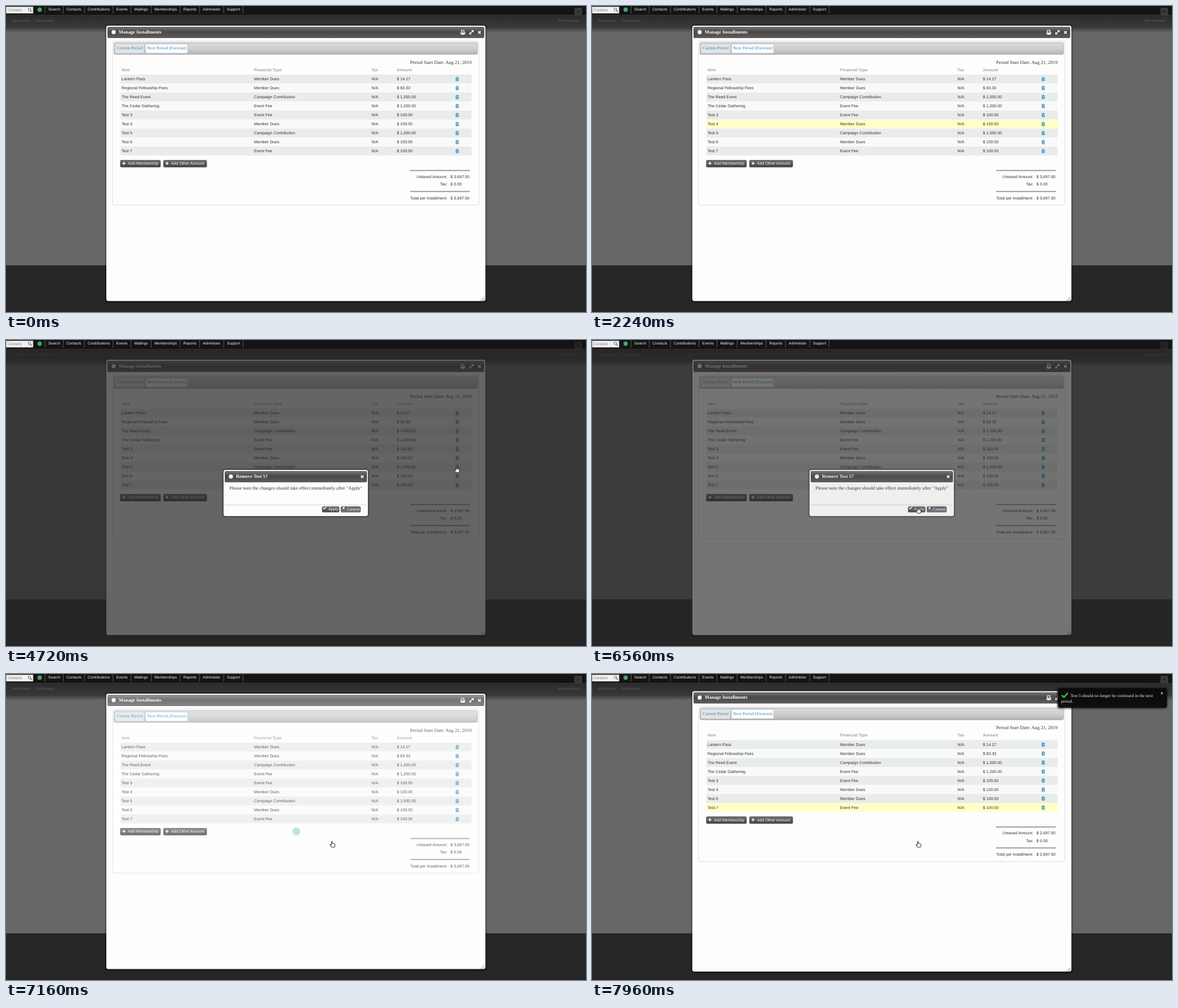
Write an HTML page that moves like this. It is 1029 px wide and 544 px high and loops after 8000 ms.

```html
<!DOCTYPE html>
<html lang="en">
<head>
<meta charset="utf-8">
<title>Manage Installments</title>
<style>
html, body { margin: 0; width: 100%; height: 100%; overflow: hidden; background: #262626; }
svg { display: block; width: 100vw; height: 100vh; }
text { font-family: "Liberation Sans", Arial, sans-serif; font-size: 7.15px; fill: #333; text-rendering: geometricPrecision; white-space: pre; }
.serif { font-family: "Liberation Serif", "Times New Roman", serif; }
.bold { font-weight: bold; }
</style>
</head>
<body>
<svg id="stage" viewBox="0 0 1029 544">
  <defs>
    <linearGradient id="bar" x2="0" y2="1">
      <stop offset="0" stop-color="#747474"/><stop offset=".45" stop-color="#484848"/><stop offset="1" stop-color="#5c5c5c"/>
    </linearGradient>
    <linearGradient id="tabs" x2="0" y2="1">
      <stop offset="0" stop-color="#d9d9d9"/><stop offset=".5" stop-color="#cfcfcf"/><stop offset="1" stop-color="#b4b4b4"/>
    </linearGradient>
    <linearGradient id="btn" x2="0" y2="1">
      <stop offset="0" stop-color="#707070"/><stop offset="1" stop-color="#434343"/>
    </linearGradient>
    <linearGradient id="cool" x2="0" y2="1">
      <stop offset="0" stop-color="#545a5f"/><stop offset="1" stop-color="#747a80"/>
    </linearGradient>
    <linearGradient id="under" x2="0" y2="1">
      <stop offset="0" stop-color="#3a3a3a"/><stop offset="1" stop-color="#666"/>
    </linearGradient>
    <linearGradient id="strip" x2="0" y2="1">
      <stop offset="0" stop-color="#2a2a2a"/><stop offset="1" stop-color="#383838"/>
    </linearGradient>
    <filter id="glow" x="-5%" y="-5%" width="110%" height="110%">
      <feGaussianBlur stdDeviation="1.8"/>
    </filter>
  </defs>
</svg>
<script>
const NS = "http://www.w3.org/2000/svg";
const stage = document.getElementById("stage");
const LOOP = 8000, TICK = 40;

function add(parent, tag, attrs = {}, content) {
  const el = document.createElementNS(NS, tag);
  for (const k in attrs) el.setAttribute(k, attrs[k]);
  if (content !== undefined) el.textContent = content;
  parent.appendChild(el);
  return el;
}
const group = (p, attrs) => add(p, "g", attrs);
const rect = (p, x, y, width, height, fill, more) => add(p, "rect", { x, y, width, height, fill, ...more });
const path = (p, d, more) => add(p, "path", { d, fill: "none", ...more });
const dot = (p, cx, cy, r, fill) => add(p, "circle", { cx, cy, r, fill });
function label(p, x, y, str, { size, fill, cls, end } = {}) {
  let style = "";
  if (size) style += `font-size:${size}px;`;
  if (fill) style += `fill:${fill};`;
  return add(p, "text", { x, y, style, class: cls || "", "text-anchor": end ? "end" : "start" }, str);
}
const cross = (p, x, y, r, w) =>
  path(p, `M${x - r} ${y - r}l${2 * r} ${2 * r}m0 ${-2 * r}l${-2 * r} ${2 * r}`, { stroke: "#fff", "stroke-width": w });

// Page behind the dialog
const page = group(stage);
rect(page, 0, 0, 1029, 461, "#666");
rect(page, 0, 461, 1029, 83, "#262626");
rect(page, 0, 14, 1029, 24, "url(#strip)");
rect(page, 0, 38, 1029, 9, "url(#under)");
[[11, "Add contact"], [52, "Find contact"], [980, "Edit shortcuts"]].forEach(([x, s]) =>
  label(page, x, 27.5, s, { size: 6.1, fill: "#626262" }));

// Main dialog
const dialog = group(stage);
const shade = rect(dialog, 177, 34, 675, 493, "#000", { rx: 4, opacity: .45, filter: "url(#glow)" });
const frame = rect(dialog, 178.5, 35.5, 671.5, 488.5, "#fdfdfd", { rx: 2.5, stroke: "#fff" });
rect(dialog, 180.5, 37.5, 667.5, 19, "url(#bar)", { rx: 1.5, stroke: "#4a4a4a", "stroke-width": .8 });
dot(dialog, 191, 46.5, 3.7, "#f4f4f4");
label(dialog, 200, 48.5, "Manage Installments", { size: 8.45, fill: "#fff", cls: "serif bold" });
path(dialog, "M808 46v-3h4.5v3M807 46.5h7v3h-7zM808.3 48.5h4.4v2h-4.4z", { stroke: "#fff", "stroke-width": 1.1 });
path(dialog, "M823 49.5l5.5-5.5M825.8 43.6h3.2v3.2M822.6 46.8v3.2h3.2", { stroke: "#fff", "stroke-width": 1.2 });
cross(dialog, 840, 47, 2.2, 1.8);
const grip = path(dialog, "M842 524l7-7M844.5 524l4.5-4.5M847 524l2-2", { stroke: "#888", "stroke-width": .9 });

const panel = rect(dialog, 189, 62.5, 650, 291.5, "none", { rx: 3, stroke: "#dcdce2" });
rect(dialog, 191.5, 65, 645, 21, "url(#tabs)", { rx: 2.5, stroke: "#a9a9b4", "stroke-width": .9 });
rect(dialog, 193.5, 67.5, 51.5, 16.5, "#e4e4e4", { rx: 1.5, stroke: "#c8c8c8", "stroke-width": .8 });
rect(dialog, 247.5, 67.5, 75, 16.5, "#fff", { rx: 1.5, stroke: "#b4b4b4", "stroke-width": .8 });
label(dialog, 196.5, 77.2, "Current Period", { size: 7.7, fill: "#2786c2", cls: "serif" });
label(dialog, 250.3, 77.2, "Next Period (Forecast)", { size: 7.7, fill: "#2786c2", cls: "serif" });
label(dialog, 826, 102.7, "Period Start Date: Aug 21, 2019", { size: 8.5, cls: "serif", end: true });

const COLS = [205, 440, 648.5, 693.5];
["Item", "Financial Type", "Tax", "Amount"].forEach((s, i) =>
  label(dialog, COLS[i], 115.9, s, { fill: "#a2a2a2", cls: "bold" }));

const DUES = "Member Dues", FEE = "Event Fee", GIFT = "Campaign Contribution";
const rows = [
  ["Lantern Pass", DUES, "14.17"],
  ["Regional Fellowship Fees", DUES, "83.33"],
  ["The Reed Event", GIFT, "1,000.00"],
  ["The Cedar Gathering", FEE, "1,200.00"],
  ["Test 3", FEE, "100.00"],
  ["Test 4", DUES, "100.00"],
  ["Test 5", GIFT, "1,000.00"],
  ["Test 6", DUES, "100.00"],
  ["Test 7", FEE, "100.00"]
].map(([item, type, sum]) => {
  const g = group(dialog);
  const back = rect(g, 203, 122, 623, 16, "#fff");
  rect(g, 203, 137.5, 623, .5, "#f4f4f4");
  [item, type, "N/A", "$ " + sum].forEach((s, i) => label(g, COLS[i], 132.3, s));
  const bin = path(g, "M797.6 127.9h5.8M799.4 127.6v-.9h2.2v.9M798.4 128.4v4.6h4.2v-4.6M799.8 129.3v2.8M801.2 129.3v2.8",
    { "stroke-width": 1 });
  return { g, back, bin };
});
const REMOVED = 6;

// Buttons and totals, below the table
const foot = group(dialog);
function button(p, x, y, w, h, str, textX, textY, fill, edge) {
  rect(p, x, y, w, h, fill, { rx: 1.5, stroke: edge, "stroke-width": .8 });
  label(p, textX, textY, str, { fill: "#f4f4f4" });
}
[[203, 71, "Add Membership"], [279.5, 76.5, "Add Other Amount"]].forEach(([x, w, s]) => {
  button(foot, x, 274.3, w, 12, s, x + 13.2, 282.4, "url(#btn)", "#3a3a3a");
  path(foot, `M${x + 3.5} 279.7h5.4m-2.7-2.7v5.4`, { stroke: "#fff", "stroke-width": 1.5 });
});
rect(foot, 717, 291.5, 106, 1.9, "#999");
rect(foot, 717, 328.8, 106, 1.9, "#999");
const sums = [["Untaxed Amount:", 305.9], ["Tax:", 319.3], ["Total per Installment:", 343.5]].map(([s, y]) => {
  label(foot, 783, y, s, { end: true });
  return label(foot, 788.6, y, "$ 0.00");
});

// Busy veil over the dialog
const veil = rect(dialog, 179, 36, 670.5, 488, "#fff");
const spinner = dot(stage, 515, 280, 7, "#4bb36e");

// Confirmation
const dim = rect(stage, 0, 0, 1029, 544, "#252525");
const modal = group(stage);
rect(modal, 385, 230, 258, 84, "#000", { rx: 4, opacity: .5, filter: "url(#glow)" });
rect(modal, 386.5, 231.5, 255, 81, "#fdfdfd", { rx: 2.5, stroke: "#fff" });
rect(modal, 388.5, 233.5, 251.5, 19, "url(#bar)", { rx: 1.5, stroke: "#4a4a4a", "stroke-width": .8 });
dot(modal, 399, 242.8, 3.7, "#f4f4f4");
label(modal, 408, 244.9, "Remove Test 5?", { size: 8.45, fill: "#fff", cls: "serif bold" });
cross(modal, 632, 243, 2.2, 1.8);
label(modal, 396.5, 265.8, 'Please note the changes should take effect immediately after "Apply"', { size: 8.5, cls: "serif" });
rect(modal, 388, 292.8, 252, .9, "#ccc");
button(modal, 561, 296.2, 30, 9.8, "Apply", 572, 303.2, "url(#btn)", "#7c4a40");
button(modal, 594.3, 296.2, 34.5, 9.8, "Cancel", 605, 303.2, "url(#cool)", "#50565c");
path(modal, "M562.8 298.4l1.8 2 3.4-4", { stroke: "#fff", "stroke-width": 1.4 });
cross(modal, 599, 298.6, 1.7, 1.3);

// Menu bar
rect(stage, 0, 0, 1029, 14.5, "#141414");
rect(stage, 0, 14, 1029, 1, "#080808");
rect(stage, .5, 1.5, 47.5, 11.5, "#f0f0f0", { stroke: "#bbb", "stroke-width": .6 });
label(stage, 2.8, 9.2, "Contacts", { size: 6.35, fill: "#7d7d7d" });
add(stage, "circle", { cx: 41.6, cy: 6, r: 2.3, fill: "none", stroke: "#666" });
path(stage, "M43.3 7.8l2.5 2.5", { stroke: "#666", "stroke-width": 1.4 });
dot(stage, 59.7, 6.5, 3.9, "#43a566");
[[75, "Search"], [107.3, "Contacts"], [145, "Contributions"], [195.6, "Events"], [227.4, "Mailings"],
 [263.3, "Memberships"], [314.6, "Reports"], [349, "Administer"], [392, "Support"], [426.5]].forEach(([x, s]) => {
  rect(stage, x - 6.2, 0, .8, 13.5, "#6a6a6a");
  if (s) label(stage, x, 8.4, s, { size: 6.67, fill: "#f4f4f4" });
});
const hideBox = group(stage);
rect(hideBox, 1008.5, 3, 13.5, 14, "#3a3a3a", { rx: 2 });
path(hideBox, "M1013.7 8.5l3 3m0-3l-3 3", { stroke: "#141414", "stroke-width": 1.2 });

// Notice
const toast = group(stage);
rect(toast, 825, 24, 196, 38, "#000", { rx: 5, opacity: .5, filter: "url(#glow)" });
rect(toast, 826.5, 25, 193.5, 35, "#0b0b0b", { rx: 4, opacity: .94 });
path(toast, "M833.5 37.8l3.7 3.6 7-7.6", { stroke: "#35c22f", "stroke-width": 2.7 });
label(toast, 849, 41.4, "Test 5 should no longer be continued in the next", { size: 7.62, fill: "#f2f2f2", cls: "serif" });
label(toast, 832, 51.2, "period.", { size: 7.62, fill: "#f2f2f2", cls: "serif" });
label(toast, 1009, 36.4, "x", { size: 8, fill: "#fff", cls: "serif bold" });

// Hand pointer
const hand = group(stage);
path(hand, "M-1.3 .6Q-.5-.6 .4.6V4Q1.6 3.3 2.2 4.2Q3.4 3.6 3.9 4.6Q5 4.2 5.1 5.4V7.8L4.2 10.4H-1L-3.6 6.8Q-4.2 5.4-2.6 5.6L-1.3 6.8Z",
  { style: "fill:#fff", stroke: "#111", "stroke-width": .9, "stroke-linejoin": "round" });

// Steps: [start, value]
const HOVER = [[0, -1], [520, 3], [1320, -1], [2240, 5], [2640, 6], [4400, -1], [7960, 8]];
const POINTER = [[0, null], [4560, [799.4, 225.3]], [6160, [578.6, 297.5]]];
const GROWTH = [[0, 0], [7400, 1], [7760, 9]];
const OPEN = 4560, CLOSE = 6560, CLOSED = 6920, BUSY = 7000, UPDATE = 7400, DONE = 7600;

const at = (steps, t) => steps.reduce((v, [from, next]) => t >= from ? next : v, null);
const ramp = (t, a, b) => Math.min(1, Math.max(0, (t - a) / (b - a)));
const show = (el, on) => el.setAttribute("visibility", on ? "visible" : "hidden");
const fade = (el, v) => el.setAttribute("opacity", v);
const move = (el, x, y) => el.setAttribute("transform", `translate(${x} ${y})`);

function render(time) {
  const t = Math.floor(time % LOOP / TICK) * TICK;
  const updated = t >= UPDATE, grown = at(GROWTH, t);
  const hover = at(HOVER, t);

  rows.forEach((row, i) => {
    const n = updated && i > REMOVED ? i - 1 : i;
    const odd = n % 2 === 0;
    show(row.g, !(updated && i === REMOVED));
    move(row.g, 0, n * 16);
    row.back.setAttribute("fill", i === hover ? (odd ? "#ffffa3" : "#ffffc8") : (odd ? "#e8ecea" : "#f9f9f9"));
    row.bin.setAttribute("stroke", i === REMOVED && t >= 3440 && t < 4400 ? "#b03020" : "#2786c2");
  });
  const total = updated ? "$ 2,697.50" : "$ 3,697.50";
  sums[0].textContent = sums[2].textContent = total;
  move(foot, 0, updated ? -16 : 0);
  panel.setAttribute("height", updated ? 275.5 : 291.5);

  move(dialog, 0, -grown / 2);
  frame.setAttribute("height", 488.5 + grown);
  shade.setAttribute("height", 493 + grown);
  move(grip, 0, grown);

  const busy = ramp(t, BUSY, BUSY + 200) * (1 - ramp(t, 7360, DONE));
  fade(veil, busy * .3);
  fade(spinner, busy * .4);

  const open = ramp(t, OPEN - 80, OPEN + 160) * (1 - ramp(t, CLOSE - TICK, CLOSED));
  show(dim, t >= OPEN);
  show(modal, t >= OPEN);
  fade(dim, open * .7);
  fade(modal, open);
  fade(hideBox, 1 - open * .6);
  fade(toast, ramp(t, 7200, UPDATE));

  const p = at(POINTER, t);
  show(hand, p);
  if (p) move(hand, p[0], p[1]);
}

const start = performance.now();
function tick() {
  render(performance.now() - start);
  requestAnimationFrame(tick);
}
tick();
</script>
</body>
</html>
```
